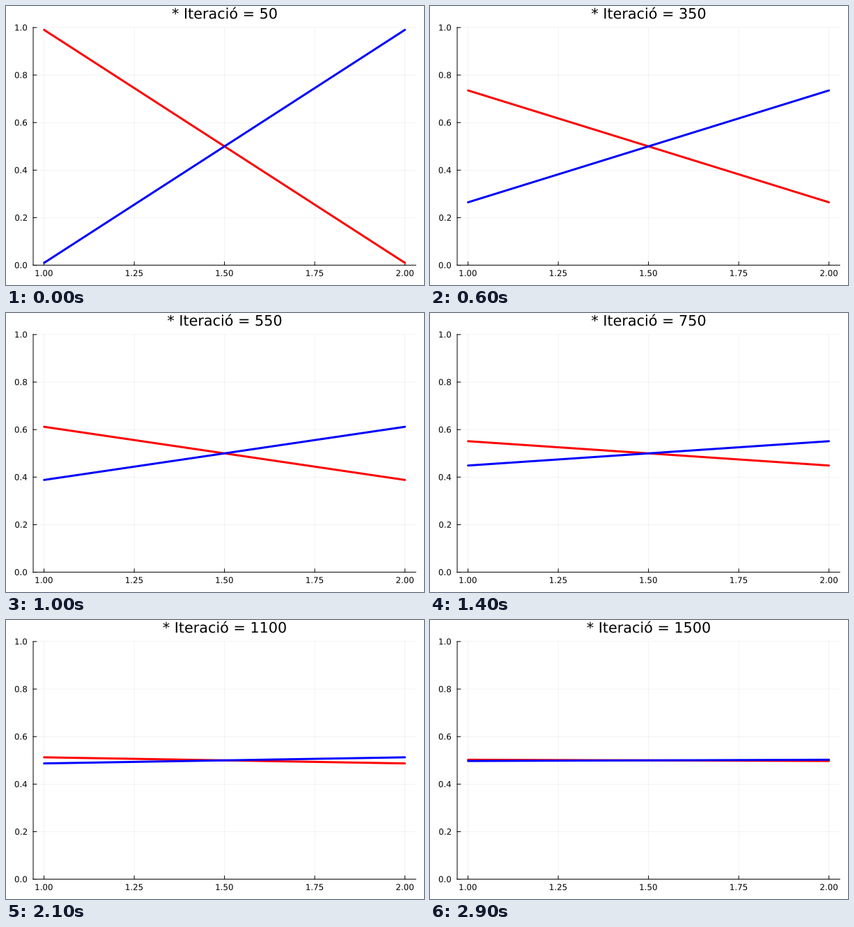
A matplotlib script that plays this animation: 600 by 400 pixels, repeating every 3000 ms.

```python
import numpy as np
import matplotlib.pyplot as plt
from matplotlib.animation import FuncAnimation
from matplotlib.patches import PathPatch
from matplotlib.path import Path
from matplotlib.textpath import TextPath

W, H, DPI = 600, 400, 100
FRAMES, INTERVAL = 30, 100
STEP = 50            # iterations per frame
RATE = 0.198         # decay per frame

# Plot area and text sizes in pixels
LEFT, RIGHT, TOP, BOTTOM = 39.03, 588.19, 30.87, 371.61
TICK = 4.72
TICK_SIZE, TITLE_SIZE = 11.85, 20.74
TITLE_X, TITLE_Y = (LEFT + RIGHT) / 2, 18.14

plt.rcParams["font.family"] = "DejaVu Sans"
fig = plt.figure(figsize=(W / DPI, H / DPI), dpi=DPI, facecolor="white")
ax = fig.add_axes([0, 0, 1, 1])
ax.set_xlim(0, W)
ax.set_ylim(H, 0)
ax.axis("off")


def px(x):
    return LEFT + (x - 0.97) / 1.06 * (RIGHT - LEFT)


def py(y):
    return BOTTOM - y * (BOTTOM - TOP)


def stroke(xs, ys, width=1, color="black", **kw):
    return ax.plot(xs, ys, color=color, linewidth=width * 72 / DPI,
                   snap=False, **kw)[0]


def text_path(x, y, s, size, align=0.5):
    """Outline of s on baseline y; align 0.5 centres it, 1 ends it at x."""
    path = TextPath((0, 0), s, size=size)
    box = path.get_extents()
    shift = x - box.x0 - align * box.width
    return Path(path.vertices * [1, -1] + [shift, y], path.codes)


def write(*args):
    patch = PathPatch(text_path(*args), facecolor="black", linewidth=0,
                      snap=False)
    return ax.add_patch(patch)


for v in np.linspace(1, 2, 5):
    x = px(v)
    stroke([x, x], [BOTTOM, TOP], 0.5, alpha=0.1)
    stroke([x, x], [BOTTOM, BOTTOM - TICK])
    write(x, 387.21, f"{v:.2f}", TICK_SIZE)

for v in np.linspace(0, 1, 6):
    y = py(v)
    stroke([LEFT, RIGHT], [y, y], 0.5, alpha=0.1)
    stroke([LEFT, LEFT + TICK], [y, y])
    write(LEFT - 9, y + 4.32, f"{v:.1f}", TICK_SIZE, 1)

stroke([LEFT, RIGHT], [BOTTOM, BOTTOM])
stroke([LEFT, LEFT], [BOTTOM, TOP])

ends = [px(1), px(2)]
red, blue = (stroke(ends, [py(0.5)] * 2, 3, c, solid_capstyle="round")
             for c in ("#ff0000", "#0000ff"))
title = write(TITLE_X, TITLE_Y, "* Iteració = 0", TITLE_SIZE)


def update(i):
    n = i + 1
    gap = 0.5 / np.cosh(RATE * n)
    high, low = py(0.5 + gap), py(0.5 - gap)
    red.set_ydata([high, low])
    blue.set_ydata([low, high])
    title.set_path(text_path(TITLE_X, TITLE_Y, f"* Iteració = {STEP * n}",
                             TITLE_SIZE))
    return red, blue, title


anim = FuncAnimation(fig, update, frames=FRAMES, interval=INTERVAL,
                     repeat=True, repeat_delay=0)
plt.show()
```
